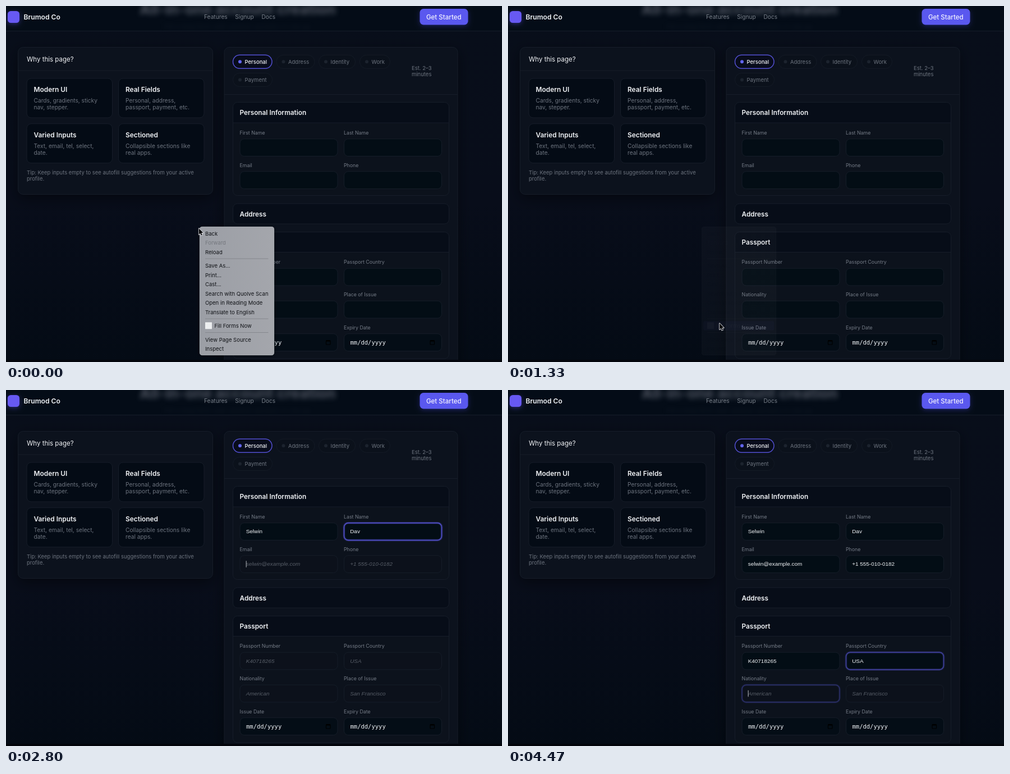
These frames come from a looping animation (884 px wide and 634 px high, 4.54 s). An HTML page with a canvas:

```html
<!DOCTYPE html>
<html lang="en">
<head>
<meta charset="utf-8">
<title>Form autofill</title>
<style>
  html, body { margin: 0; width: 100%; height: 100%; overflow: hidden; background: #070d18; }
  canvas { display: block; width: 884px; height: 634px; }
</style>
</head>
<body>
<canvas id="stage"></canvas>
<script>
const W = 884, H = 634, LOOP = 4540, STEP = 200 / 3;
const UI = 'Inter, sans-serif';
const INPUT = '9.93px "Liberation Sans", Arial, sans-serif';
const MONO = '10.5px "DejaVu Sans Mono", monospace';
const WHITE = '#f1f3f6', MUTED = '#6d747f', EDGE = '#161d29';
const dpr = window.devicePixelRatio || 1;

function setup(canvas) {
  canvas.width = W * dpr;
  canvas.height = H * dpr;
  const c = canvas.getContext('2d');
  c.scale(dpr, dpr);
  return c;
}
const ctx = setup(document.getElementById('stage'));
const page = document.createElement('canvas');

function box(c, x, y, x2, y2, r, fill, stroke, line = 1) {
  c.beginPath();
  c.roundRect(x, y, x2 - x, y2 - y, r);
  if (fill) { c.fillStyle = fill; c.fill(); }
  if (stroke) { c.strokeStyle = stroke; c.lineWidth = line; c.stroke(); }
}
function text(c, str, x, y, font, color) {
  c.font = font;
  c.fillStyle = color;
  c.fillText(str, x, y);
}
const label = (c, str, x, y, size, color = MUTED, weight = 400) =>
  text(c, str, x, y, `${weight} ${size}px ${UI}`, color);
function rule(c, x, x2, y, color = EDGE) {
  c.fillStyle = color;
  c.fillRect(x, y - 0.5, x2 - x, 1);
}
const clamp01 = v => Math.max(0, Math.min(1, v));
const ease = v => { v = clamp01(v); return v * v * (3 - 2 * v); };
const mix = (a, b, k) => a + (b - a) * k;

const LEFT = 416.5, RIGHT = 602, FIELD_W = 175, FIELD_H = 31;
// name, column, top, value, focus time, accept time
const fields = [
  ['First Name', LEFT, 236.5, 'Selwin', 1930, 2400],
  ['Last Name', RIGHT, 236.5, 'Dav', 2460, 2780],
  ['Email', LEFT, 294.5, 'selwin@example.com', 2800, 2990],
  ['Phone', RIGHT, 294.5, '+1 555-010-0182', 3010, 3190],
  ['Passport Number', LEFT, 467, 'K40718265', 3690, 4080],
  ['Passport Country', RIGHT, 467, 'USA', 4130, 4390],
  ['Nationality', LEFT, 525, 'American', 4415, 9999],
  ['Place of Issue', RIGHT, 525, 'San Francisco', 9999, 9999],
  ['Issue Date', LEFT, 583.5],
  ['Expiry Date', RIGHT, 583.5]
].map(([name, x, y, value, focus, accept]) => ({ name, x, y, value, focus, accept }));
const SUGGEST = 1930;

function card(c, x, y, x2, y2) {
  c.save();
  c.shadowColor = 'rgba(0,0,0,.45)';
  c.shadowBlur = 24 * dpr;
  c.shadowOffsetY = 7 * dpr;
  box(c, x, y, x2, y2, 9, '#0c121d');
  c.restore();
  box(c, x, y, x2, y2, 9, null, EDGE);
}
function section(c, title, y, y2, headY) {
  box(c, 404.5, y, 789.5, y2, 8, '#0c121c');
  box(c, 404.5, y, 789.5, headY, y2 === headY ? 8 : [8, 8, 0, 0], '#070d18');
  box(c, 404.5, y, 789.5, y2, 8, null, EDGE);
  if (headY < y2) rule(c, 405, 789, headY);
  label(c, title, 416.5, y + 22.7, 11.8, WHITE, 600);
}
function pill(c, name, x, x2, y, active) {
  box(c, x, y, x2, y + 24, 12, active ? '#080c1c' : '#0b111b', active ? '#524fd0' : '#141b26', active ? 1.5 : 1);
  c.beginPath();
  c.arc(x + 12.5, y + 12, 3, 0, 7);
  c.fillStyle = active ? '#6265ee' : '#1c232e';
  c.fill();
  label(c, name, x + 21, y + 15.6, 9.5, active ? WHITE : MUTED, active ? 500 : 400);
}
function tile(c, title, lines, x, y) {
  box(c, x, y, x + 152.5, y + 70, 8, '#040b15', EDGE);
  label(c, title, x + 12.5, y + 24, 11.9, WHITE, 600);
  lines.forEach((s, i) => label(c, s, x + 12.5, y + 43 + i * 12.4, 10.2));
}
function header(c) {
  c.fillStyle = '#040c17';
  c.fillRect(0, 0, W, 44);
  c.save();
  c.beginPath();
  c.rect(0, 0, W, 44);
  c.clip();
  c.textAlign = 'center';
  c.filter = `blur(${5 * dpr}px)`;
  label(c, 'All-in-one account creation', 413, 15, 26, 'rgba(200,206,218,.38)', 700);
  label(c, 'Fill a long form with several sections in one go', 413, 41, 12, 'rgba(150,160,180,.1)');
  c.restore();
  rule(c, 0, W, 44.5, '#151e2a');

  c.save();
  c.shadowColor = 'rgba(99,90,245,.4)';
  c.shadowBlur = 9 * dpr;
  c.shadowOffsetY = 2 * dpr;
  box(c, 3, 9, 24, 30, 5.5, '#6759f3');
  c.shadowColor = 'rgba(70,70,220,.35)';
  box(c, 737.5, 5, 823.5, 33.5, 6.5, '#5a58ef');
  c.restore();
  label(c, 'Brumod Co', 31.5, 23.5, 12.1, WHITE, 600);
  label(c, 'Features', 353, 23.3, 10.2, '#787f89');
  label(c, 'Signup', 408.3, 23.3, 10.2, '#787f89');
  label(c, 'Docs', 455.5, 23.3, 10.2, '#787f89');
  label(c, 'Get Started', 749, 23.7, 11.5, '#f4f4ff', 500);
}
function drawPage(c) {
  const bg = c.createLinearGradient(0, 0, 0, H);
  bg.addColorStop(0, '#080e1a');
  bg.addColorStop(0.55, '#080d1a');
  bg.addColorStop(1, '#040b15');
  c.fillStyle = bg;
  c.fillRect(0, 0, W, H);

  card(c, 21.5, 73.5, 368.5, 335.5);
  rule(c, 22, 368, 115);
  label(c, 'Why this page?', 37, 98.5, 11.5, WHITE);
  tile(c, 'Modern UI', ['Cards, gradients, sticky', 'nav, stepper.'], 37, 129);
  tile(c, 'Real Fields', ['Personal, address,', 'passport, payment, etc.'], 200.5, 129);
  tile(c, 'Varied Inputs', ['Text, email, tel, select,', 'date.'], 37, 209.7);
  tile(c, 'Sectioned', ['Collapsible sections like', 'real apps.'], 200.5, 209.7);
  label(c, 'Tip: Keep inputs empty to see autofill suggestions from your active', 37, 299.5, 9.45);
  label(c, 'profile.', 37, 310.8, 9.45);

  card(c, 389, 73.5, 805, 660);
  rule(c, 389, 805, 157.5);
  pill(c, 'Personal', 404.5, 474, 87.3, true);
  pill(c, 'Address', 482, 550, 87.3);
  pill(c, 'Identity', 557.5, 622.5, 87.3);
  pill(c, 'Work', 630.5, 684.5, 87.3);
  pill(c, 'Payment', 404.5, 474.5, 119.5);
  label(c, 'Est. 2–3', 723, 113.5, 9.5);
  label(c, 'minutes', 723, 124.8, 9.5);

  section(c, 'Personal Information', 171.5, 337.5, 208);
  section(c, 'Address', 352, 388, 388);
  section(c, 'Passport', 402.5, 628, 438.5);
  for (const f of fields) {
    label(c, f.name, f.x, f.y - 7.7, 8.8, '#757c87');
    if (!f.value) dateField(c, f);
  }
  c.fillStyle = '#03050c';
  c.fillRect(0, 630, W, 4);
  header(c);
}
function dateField(c, f) {
  frame(c, f, '#040d16');
  text(c, 'mm/dd/yyyy', f.x + 11.5, f.y + 19.5, MONO, WHITE);
  const x = f.x + 154, y = f.y + 12;
  box(c, x, y, x + 7.5, y + 7.5, 1, null, '#000', 1.1);
  c.fillStyle = '#000';
  c.fillRect(x, y, 7.5, 2);
}
function frame(c, f, fill, stroke = '#151d28', line = 1) {
  box(c, f.x + 0.5, f.y + 0.2, f.x + FIELD_W - 0.5, f.y + FIELD_H, 7.5, fill, stroke, line);
}

function drawField(f, i, t) {
  const next = fields[i + 1].focus || 9999;
  const filled = t >= f.accept, ghost = t >= SUGGEST && !filled;
  const focused = t >= f.focus && t < next;
  const ring = clamp01((t - f.focus) / 150) * (1 - clamp01((t - next) / 150));
  frame(ctx, f, ghost ? '#0c111b' : '#030d15');
  if (ring > 0) {
    frame(ctx, f, null, `rgba(99,102,241,${0.25 * ring})`, 4);
    frame(ctx, f, null, `rgba(86,82,214,${ring})`, 1.4);
  }
  const x = f.x + 11.2;
  ctx.font = INPUT;
  if (filled) text(ctx, f.value, x, f.y + 18.6, INPUT, WHITE);
  else if (ghost) text(ctx, f.value, x, f.y + 18.6, 'italic ' + INPUT, '#575d67');
  if (focused) {
    const end = filled ? ctx.measureText(f.value).width : 0;
    ctx.fillStyle = '#c9ccd2';
    ctx.fillRect(x + end, f.y + 9.8, 0.9, 11.5);
  }
}

const items = [
  ['Back', 405], ['Forward', 421.5], ['Reload', 438], ['Save As...', 462.5], ['Print...', 479],
  ['Cast...', 495.5], ['Search with Quolve Scan', 512], ['Open in Reading Mode', 528.5],
  ['Translate to English', 545], ['Fill Forms Now', 569.5], ['View Page Source', 594], ['Inspect', 610.5]
];
function drawMenu(t, pointer) {
  // held opaque, then a quick fade after the click
  const alpha = t < 1190 ? 1 : t < 1260 ? 0.91 : t < 1325 ? 0.45 : t < 1390 ? 0.035 : 0;
  if (!alpha) return;
  ctx.save();
  ctx.globalAlpha = alpha;
  const fill = ctx.createLinearGradient(345, 0, 478, 0);
  fill.addColorStop(0, '#9b9ea5');
  fill.addColorStop(1, '#a4a6ac');
  ctx.shadowColor = 'rgba(0,0,0,.4)';
  ctx.shadowBlur = 10 * dpr;
  box(ctx, 345, 393, 478, 622, 4.5, fill);
  ctx.shadowColor = 'transparent';
  box(ctx, 345.3, 393.3, 477.7, 621.7, 4.5, null, '#aeb0b5', 0.6);
  for (const y of [450, 557, 581.5]) rule(ctx, 355, 467.5, y, '#85888e');
  for (const [name, y] of items) {
    const off = name === 'Forward', fillItem = name === 'Fill Forms Now';
    const hot = !off && pointer.x > 348 && Math.abs(pointer.y - y) < 8.2;
    if (hot) box(ctx, 348, y - 8.2, 474.5, y + 8.2, 3, '#5350ba');
    if (fillItem) box(ctx, 355, y - 6.2, 367, y + 5.8, 0.5, '#eceef0');
    label(ctx, name, fillItem ? 371.5 : 355, y + 3.5, 9.5, hot ? '#f3f3fb' : off ? '#74777e' : '#111317');
  }
  ctx.restore();
}

// start, end, destination
const moves = [[100, 560, 375.5, 546], [680, 1000, 377, 565], [1400, 1920, 452, 248]];
function pointerAt(t) {
  const p = { x: 343.7, y: 396 };
  for (const [from, to, x, y] of moves) {
    const k = ease((t - from) / (to - from));
    p.x = mix(p.x, x, k);
    p.y = mix(p.y, y, k);
  }
  return p;
}
function drawPointer({ x, y }) {
  const shape = [[0, 0], [0, 11.2], [2.6, 8.8], [4.2, 12.6], [6, 11.8], [4.4, 8.1], [7.8, 8.1]];
  ctx.beginPath();
  for (const [dx, dy] of shape) ctx.lineTo(x + dx, y + dy);
  ctx.closePath();
  ctx.lineJoin = 'round';
  ctx.strokeStyle = '#e8e9ec';
  ctx.lineWidth = 1.6;
  ctx.stroke();
  ctx.fillStyle = '#05060a';
  ctx.fill();
}

function draw(now) {
  const t = Math.min(67, Math.floor((now % LOOP + 4) / STEP)) * STEP;
  const pointer = pointerAt(t);
  ctx.drawImage(page, 0, 0, W, H);
  fields.forEach((f, i) => f.value && drawField(f, i, t));
  drawMenu(t, pointer);
  if (t < SUGGEST) drawPointer(pointer);
}

drawPage(setup(page));
const start = performance.now();
function tick() {
  draw(performance.now() - start);
  requestAnimationFrame(tick);
}
tick();
</script>
</body>
</html>
```
